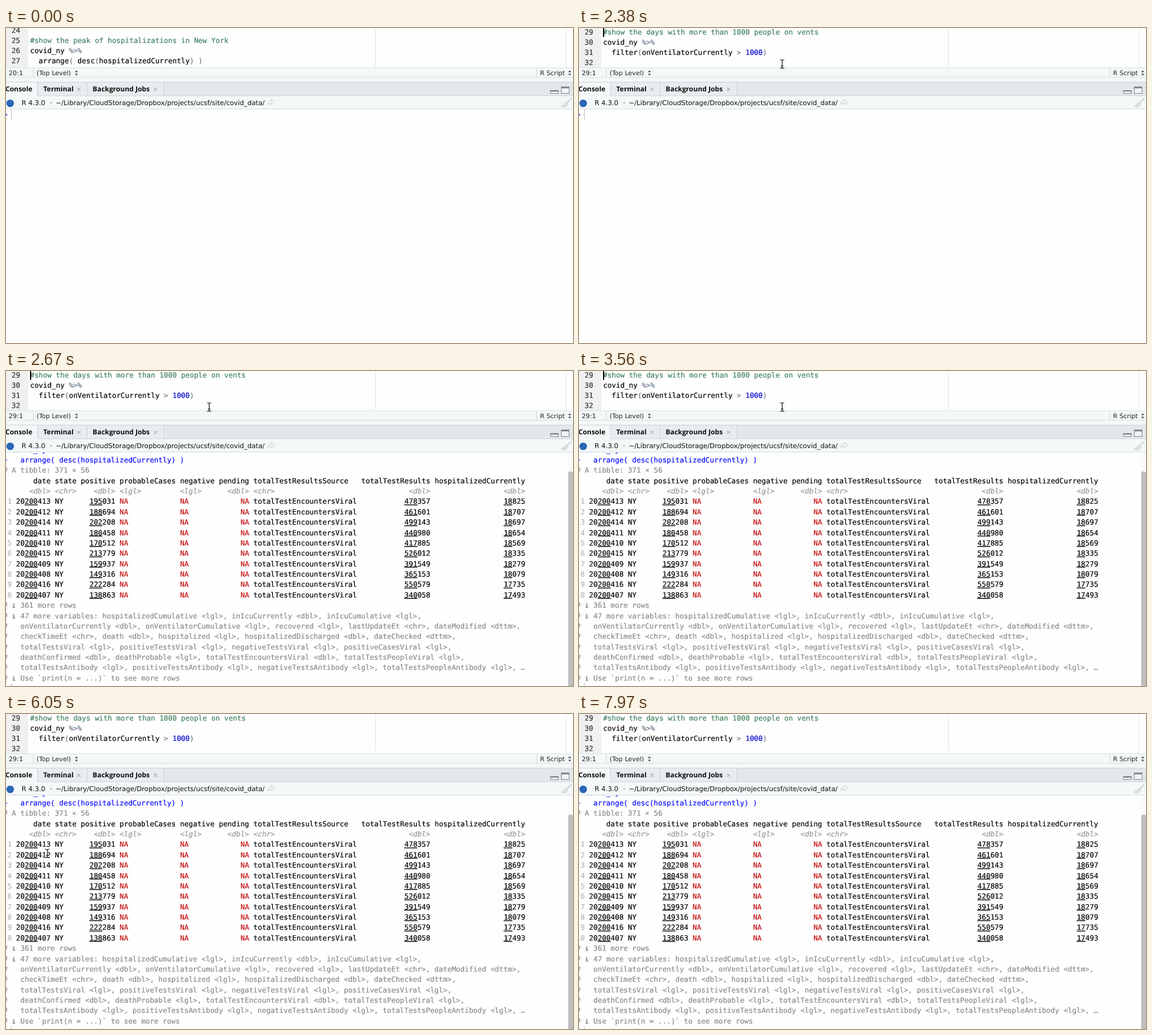
An HTML page for the animation above (7990 ms loop, 946 px wide and 527 px high).

```html
<!DOCTYPE html>
<html lang="en">
<head>
<meta charset="utf-8">
<title>Console session</title>
<style>
html, body { margin: 0; width: 100%; height: 100%; overflow: hidden; background: #fefefe; }
svg { display: block; }
text { white-space: pre; text-rendering: geometricPrecision; }
text, tspan { fill: currentColor; }
.code { font: 11.96px "DejaVu Sans Mono", "Noto Sans Mono", monospace; color: #000; stroke: currentColor; stroke-width: .18px; }
.code tspan { stroke: currentColor; }
.ui { font: 10.6px "DejaVu Sans", sans-serif; color: #222; }
.path { font-size: 11.15px; color: #111; }
.tab { font: bold 11.45px "Open Sans", "Noto Sans", sans-serif; color: #0c0c0c; }
.gutter { color: #333; }
.comment { color: #3f7f5f; }
.op { color: #687687; }
.lit { color: #0000cd; }
.echo { color: #0a0aff; }
.dim { color: #888; }
.index { color: #b4b4b4; }
.type { color: #949494; font-style: italic; }
.na { color: #c40a0a; }
.info { color: #777; font-size: 9px; font-weight: bold; }
.under { text-decoration: underline; text-decoration-thickness: 1px; text-decoration-skip-ink: none; }
</style>
</head>
<body>
<script>
const NS = "http://www.w3.org/2000/svg";
const LOOP = 7990, CHAR = 7.2, ROW = 17.38, SCROLL = 31.05;

function add(parent, tag, attrs = {}, content) {
  const node = document.createElementNS(NS, tag);
  for (const key in attrs) node.setAttribute(key, attrs[key]);
  if (content !== undefined) node.textContent = content;
  parent.appendChild(node);
  return node;
}
const group = (parent, attrs) => add(parent, "g", attrs);
const rect = (parent, x, y, width, height, fill, more) =>
  add(parent, "rect", { x, y, width, height, fill, ...more });
const label = (parent, x, y, cls, content, more) =>
  add(parent, "text", { x, y, class: cls, ...more }, content);
const path = (parent, d, stroke, width = 1, fill = "none") =>
  add(parent, "path", { d, stroke, fill, "stroke-width": width });
const show = (node, on) => node.setAttribute("visibility", on ? "inherit" : "hidden");

const svg = add(document.body, "svg", { width: 946, height: 527, viewBox: "0 0 946 527" });
const defs = add(svg, "defs");
function clip(id, y, height) {
  rect(add(defs, "clipPath", { id }), 0, y, 946, height);
  return group(svg, { "clip-path": `url(#${id})` });
}

// Editor
const editor = clip("editorArea", 0, 66);
rect(editor, 0, 0, 37, 66, "#f0f0f0");
rect(editor, 616, 0, 1, 66, "#e6e6e6");
rect(editor, 934, 0, 1, 66, "#e9e9e9");

function page(firstLine, baseline, lines) {
  const g = group(editor);
  lines.forEach((spans, i) => {
    const y = baseline + i * 17.1;
    label(g, 9.3, y, "code gutter", firstLine + i);
    const line = label(g, 40.2, y, "code", "");
    for (const [content, cls = ""] of spans) add(line, "tspan", { class: cls }, content);
  });
  return g;
}

const matchBox = rect(editor, 105, 46.5, 7.2, 16.5, "#cfcfcf");
const pageA = page(24, 7.9, [
  [],
  [["#show the peak of hospitalizations in New York", "comment"]],
  [["covid_ny "], ["%>%", "op"]],
  [["  arrange"], ["(", "op"], [" desc"], ["(", "op"], ["hospitalizedCurrently"], [") )", "op"]]
]);
const pageB = page(29, 10.8, [
  [["#show the days with more than 1000 people on vents", "comment"]],
  [["covid_ny "], ["%>%", "op"]],
  [["  filter"], ["(", "op"], ["onVentilatorCurrently "], [">", "op"], [" "], ["1000", "lit"], [")", "op"]],
  []
]);
const caretA = rect(editor, 328, 46, 2, 17, "#000");
const caretB = rect(editor, 40, 0, 2, 15, "#000");

// Status bar
rect(svg, 0, 66, 946, 17, "#f3f8f9");
rect(svg, 0, 66, 946, 1, "#dde2e4");
rect(svg, 0, 82, 946, 1, "#d9dee0");
rect(svg, 0, 83, 946, 8, "#f5f7f8");
rect(svg, 45, 67, 1, 15, "#d3d8da");
rect(svg, 885, 67, 1, 15, "#d3d8da");
const position = label(svg, 16.5, 79, "ui", "", { "text-anchor": "middle" });
label(svg, 51, 79, "ui", "(Top Level)");
label(svg, 891, 79, "ui", "R Script");
for (const x of [117.5, 940.5])
  path(svg, `M${x - 2.6} 74l2.6-3.2 2.6 3.2zM${x - 2.6} 76.6l2.6 3.2 2.6-3.2z`, "none", 0, "#555");

// Tabs
rect(svg, 0, 90, 946, 24, "#e4e7e9");
rect(svg, 0, 90, 946, 1, "#cfd4d6");
rect(svg, 52, 91, 211, 22, "#e9ecee");
rect(svg, 0, 91, 52, 23, "#f4f8f9");
rect(svg, 52, 113, 894, 1, "#d3d8da");
for (const x of [52, 135, 263]) rect(svg, x, 91, 1, 22, "#cdd2d4");
label(svg, -1, 106, "tab", "Console");
label(svg, 62.3, 106, "tab", "Terminal");
label(svg, 144.6, 106, "tab", "Background Jobs");
for (const x of [121.5, 249.5])
  path(svg, `M${x - 2.7} 99.8l5.4 5.4m0-5.4l-5.4 5.4`, "#a9adaf", 1.2);
rect(svg, 908.5, 104.5, 13, 5, "#fafafa", { stroke: "#80888c" });
rect(svg, 908, 104, 14, 2.5, "#80888c");
rect(svg, 926.5, 98.5, 13, 11, "#f2f4f5", { stroke: "#80888c" });
rect(svg, 926, 98, 14, 3, "#80888c");

// Console header
rect(svg, 0, 114, 946, 22, "#f3f8f9");
rect(svg, 0, 135, 946, 1, "#d8dddf");
add(svg, "circle", { cx: 7, cy: 126, r: 6.3, fill: "#2a66b6" });
label(svg, 26, 129, "ui path", "R 4.3.0");
label(svg, 73.5, 129, "ui path", "·");
label(svg, 83, 129, "ui path", "~/Library/CloudStorage/Dropbox/projects/ucsf/site/covid_data/");
path(svg, "M437 128.5c0-5 3-6.5 6-6.5v-2.5l5 4.5-5 4.3v-2.6c-3 0-4.5.5-6 2.8z", "#c3c8ca", 1, "#fafcfc");
path(svg, "M943.5 117.5l-7 7", "#cfd3d4", 2);
path(svg, "M926 130.5c4-1 6-4 8-7l4 3.5c-2 3.5-5 5.5-9 5z", "#c9cdce", 1, "#dfe2e3");

// Console output
const consoleArea = clip("consoleArea", 136, 391);
const output = group(consoleArea);
const tibble = group(output);
const echo = group(output);
const put = (parent, row, col, content, cls = "") =>
  label(parent, -4.8 + col * CHAR, 149.2 + row * ROW, "code " + cls, content);

put(echo, 0, 0, "> #show the peak of hospitalizations in New York", "echo");
put(echo, 1, 0, "> covid_ny %>%", "echo");
put(echo, 2, 0, "+   arrange( desc(hospitalizedCurrently) )", "echo");

function putNumber(row, endCol, value) {
  const digits = String(value);
  const [, head, thousands, rest] = digits.match(/^(.*?)(\d{1,3})(\d{3})$/);
  const node = put(tibble, row, endCol - digits.length, "");
  add(node, "tspan", {}, head);
  add(node, "tspan", { class: "under" }, thousands);
  add(node, "tspan", {}, rest);
}

// name, type, first column, end column, right aligned
const columns = [
  ["date", "dbl", 3, 11, true],
  ["state", "chr", 12, 17, false],
  ["positive", "dbl", 18, 26, true],
  ["probableCases", "lgl", 27, 40, false],
  ["negative", "lgl", 41, 49, false],
  ["pending", "dbl", 50, 57, true],
  ["totalTestResultsSource", "chr", 58, 82, false],
  ["totalTestResults", "dbl", 83, 99, true],
  ["hospitalizedCurrently", "dbl", 100, 121, true]
];
put(tibble, 3, 0, "# A tibble: 371 × 56", "dim");
for (const [name, type, start, end, right] of columns) {
  const tag = `<${type}>`;
  put(tibble, 4, right ? end - name.length : start, name);
  put(tibble, 5, right ? end - tag.length : start, tag, "type");
}

const days = [
  [13, 195031, 478357, 18825], [12, 188694, 461601, 18707],
  [14, 202208, 499143, 18697], [11, 180458, 440980, 18654],
  [10, 170512, 417885, 18569], [15, 213779, 526012, 18335],
  [9, 159937, 391549, 18279], [8, 149316, 365153, 18079],
  [16, 222284, 550579, 17735], [7, 138863, 340058, 17493]
];
days.forEach(([day, positive, tests, patients], i) => {
  const row = 6 + i;
  put(tibble, row, 0, String(i + 1).padStart(2), "index");
  putNumber(row, 11, 20200400 + day);
  put(tibble, row, 12, "NY");
  putNumber(row, 26, positive);
  for (const col of [27, 41, 55]) put(tibble, row, col, "NA", "na");
  put(tibble, row, 58, "totalTestEncountersViral");
  putNumber(row, 99, tests);
  putNumber(row, 121, patients);
});

[
  "361 more rows",
  "47 more variables: hospitalizedCumulative <lgl>, inIcuCurrently <dbl>, inIcuCumulative <lgl>,",
  "onVentilatorCurrently <dbl>, onVentilatorCumulative <lgl>, recovered <lgl>, lastUpdateEt <chr>, dateModified <dttm>,",
  "checkTimeEt <chr>, death <dbl>, hospitalized <lgl>, hospitalizedDischarged <dbl>, dateChecked <dttm>,",
  "totalTestsViral <lgl>, positiveTestsViral <lgl>, negativeTestsViral <lgl>, positiveCasesViral <lgl>,",
  "deathConfirmed <dbl>, deathProbable <lgl>, totalTestEncountersViral <dbl>, totalTestsPeopleViral <lgl>,",
  "totalTestsAntibody <lgl>, positiveTestsAntibody <lgl>, negativeTestsAntibody <lgl>, totalTestsPeopleAntibody <lgl>, …",
  "Use `print(n = ...)` to see more rows"
].forEach((line, i) => {
  const row = 16 + i;
  put(tibble, row, 0, "#", "dim");
  if (i < 2 || i === 7) put(tibble, row, 2.1, "i", "info");
  put(tibble, row, 4, line, "dim");
});

const prompt = group(output);
put(prompt, 0, 0, ">", "echo");
rect(prompt, 8.5, 136, 1, 17, "#b5b5b5");
const scrollbar = group(consoleArea);
rect(scrollbar, 937, 136, 9, 391, "#fafafa");
rect(scrollbar, 938, 168, 8, 370, "#bebebe", { rx: 4 });

// Pointer
const pointer = group(svg);
const beam = "M-3.5-7q3 0 3.5 1.5q.5-1.5 3.5-1.5M0-5.5V6M-3.5 7.500q3 0 3.5-1.5q.5 1.5 3.5 1.5M-2 3.5h4".replace("7.500", "7.5");
path(pointer, beam, "#fff", 2.6);
path(pointer, beam, "#111", 1.2);

// time, x, y
const moves = [
  [300, 374, 13], [450, 362, 32], [600, 346, 52], [740, 339, 60],
  [4450, 337, 74], [4600, 324, 112], [4740, 307, 152], [4890, 265, 208],
  [5030, 190, 256], [5180, 130, 276], [5330, 112, 262], [5470, 114, 240],
  [5620, 103, 227], [5770, 86, 222], [5910, 74, 226], [6050, 69, 233],
  [6200, 69, 262], [6350, 70, 300], [6500, 71, 333], [6650, 72, 349],
  [6790, 73, 353], [7090, 150, 364], [7230, 420, 405], [7380, 700, 460], [7530, 848, 518]
];
// Moments at which each caret flips, starting from hidden
const blinkA = [890, 1480, 1780, 2380];
const blinkB = [2380, 3110, 3560, 4150, 4600, 5180, 5620, 6050, 6500, 7090, 7530, 7970];
const lit = (flips, t) => flips.filter(at => at <= t).length % 2 === 1;

function draw(t) {
  const next = t >= 2380, echoed = t >= 2520, printed = t >= 2670;
  show(pageA, !next);
  show(pageB, next);
  show(matchBox, t >= 890 && !next);
  show(caretA, lit(blinkA, t));
  show(caretB, lit(blinkB, t));
  position.textContent = next ? "29:1" : t >= 890 ? "27:41" : "20:1";

  show(echo, echoed);
  show(tibble, printed);
  show(scrollbar, printed);
  show(prompt, !echoed || printed);
  prompt.setAttribute("transform", `translate(0 ${printed ? 24 * ROW : 0})`);
  output.setAttribute("transform", `translate(0 ${printed ? -SCROLL : 0})`);

  const move = moves.filter(m => m[0] <= t).pop();
  show(pointer, move && t < 7670);
  if (move) pointer.setAttribute("transform", `translate(${move[1]} ${move[2]})`);
}

const start = performance.now();
function tick() {
  draw((performance.now() - start) % LOOP);
  requestAnimationFrame(tick);
}
tick();
</script>
</body>
</html>
```
